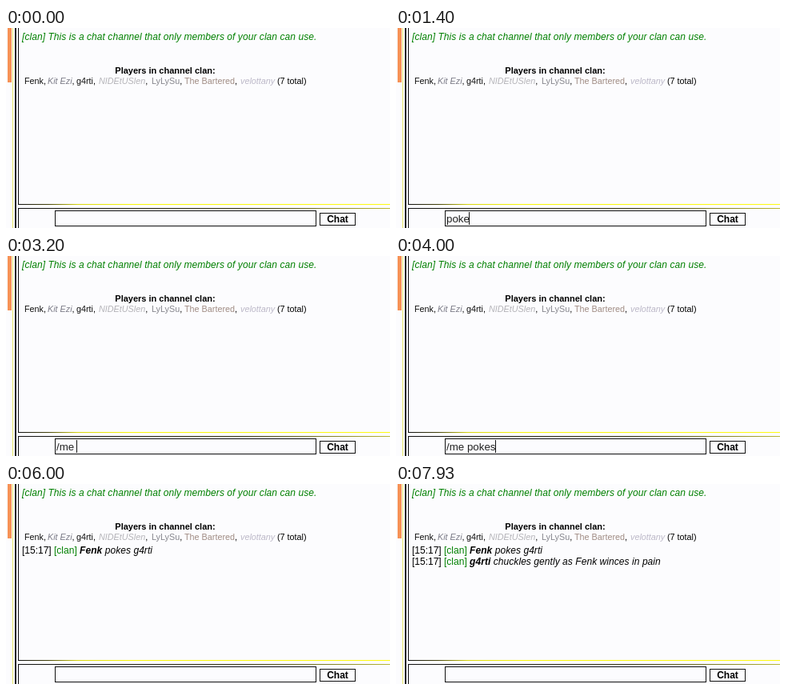
Animation of 480x250 px, one loop 8000 ms. Source, as an HTML page:

```html
<!DOCTYPE html>
<html lang="en">
<head>
<meta charset="utf-8">
<title>Clan chat</title>
<style>
  html, body { margin: 0; width: 100%; height: 100%; overflow: hidden; background: #fcfcfe; }
  svg { display: block; width: 480px; height: 250px; }
  text { font: 12px "Liberation Sans", Arial, sans-serif; white-space: pre; }
  .bold { font-weight: bold; }
  .italic { font-style: italic; letter-spacing: .06px; }
  .title { font-size: 11px; }
  .player { font-size: 10.8px; }
  .player .italic { letter-spacing: 0; }
  .clan { fill: #008000; }
  #typed { font-size: 13.33px; fill: #222; }
  .box { fill: #fcfcfe; stroke: #111; }
</style>
</head>
<body>
<svg viewBox="0 0 480 250">
  <defs>
    <linearGradient id="upper">
      <stop offset="0" stop-color="#111"/>
      <stop offset=".08" stop-color="#44420c"/>
      <stop offset=".16" stop-color="#d8d610"/>
      <stop offset=".3" stop-color="#f8f608"/>
      <stop offset="1" stop-color="#fffb10"/>
    </linearGradient>
    <linearGradient id="lower">
      <stop offset="0" stop-color="#111"/>
      <stop offset=".6" stop-color="#333210"/>
      <stop offset="1" stop-color="#b8b638"/>
    </linearGradient>
  </defs>
  <rect width="480" height="250" fill="#fcfcfe"/>

  <!-- Scrollbar and pane borders -->
  <rect x="2" width="5" height="68" fill="#f79256"/>
  <rect x="8" width="1" height="250" fill="#e9e76a"/>
  <rect x="11" width="2" height="250" fill="#222"/>
  <rect x="15" width="1" height="221" fill="#111"/>
  <rect x="15" y="220" width="465" height="1" fill="url(#upper)"/>
  <rect x="15" y="225" width="1" height="25" fill="#111"/>
  <rect x="15" y="225" width="465" height="1" fill="url(#lower)"/>

  <text class="clan italic" x="20" y="15">[clan] This is a chat channel that only members of your clan can use.</text>
  <text class="title bold" x="199" y="57" text-anchor="middle">Players in channel clan:</text>
  <g id="players"></g>
  <g id="messages"></g>

  <rect class="box" x="61.5" y="228.5" width="326" height="19"/>
  <text id="typed" x="63" y="243"></text>
  <rect id="caret" y="230" width="1" height="16" fill="#111"/>
  <rect class="box" x="392.5" y="231.5" width="44" height="15"/>
  <text class="bold" x="414.5" y="243" text-anchor="middle">Chat</text>
</svg>
<script>
const LOOP = 8000, SENT = 5350, REPLIED = 7400, BLINK = 500;
const ME = "Fenk", FRIEND = "g4rti";
const $ = id => document.getElementById(id);

function add(parent, tag, attributes, content = "") {
  const node = document.createElementNS("http://www.w3.org/2000/svg", tag);
  for (const key in attributes) node.setAttribute(key, attributes[key]);
  node.textContent = content;
  parent.append(node);
  return node;
}

// x, name, colour, style, text after the name
const players = [
  [23, ME, "#111", "", ","],
  [52, "Kit Ezi", "#7c7c88", "italic", ","],
  [88, FRIEND, "#111", "", ","],
  [116, "NIDEtUSlen", "#b4b3b8", "italic", ","],
  [182, "LyLySu", "#85858c", "", ","],
  [223, "The Bartered", "#a08c84", "", ","],
  [293, "velottany", "#bcb8c8", "italic", ""],
  [339, "", "", "", "(7 total)"]
];
for (const [x, name, fill, style, after] of players) {
  const label = add($("players"), "text", { class: "player", x, y: 70 });
  add(label, "tspan", { fill, class: style }, name);
  add(label, "tspan", {}, after);
}

function addMessage(y, name, action) {
  const line = add($("messages"), "text", { x: 20, y });
  add(line, "tspan", {}, "[15:17] ");
  add(line, "tspan", { class: "clan" }, "[clan] ");
  add(line, "tspan", { class: "bold italic" }, name);
  add(line, "tspan", { class: "italic" }, " " + action);
  return line;
}
const sentLine = addMessage(87, ME, `pokes ${FRIEND}`);
const replyLine = addMessage(101, FRIEND, `chuckles gently as ${ME} winces in pain`);

const FIRST = "poke", SECOND = `/me pokes ${FRIEND}`;
const count = (t, start, step) => Math.max(0, Math.floor((t - start) / step) + 1);

function inputAt(t) {
  if (t < 1900) return FIRST.slice(0, count(t, 900, 140));
  if (t < 2650) return FIRST.slice(0, Math.max(0, FIRST.length - count(t, 1900, 120)));
  return t < SENT ? SECOND.slice(0, count(t, 2650, 155)) : "";
}

function draw(t) {
  const value = inputAt(t);
  $("typed").textContent = value;
  const width = value ? $("typed").getComputedTextLength() : 0;
  $("caret").setAttribute("x", Math.floor(63 + width));
  const busy = t >= 850 && t < SENT;
  const blinkOn = (t + LOOP - SENT) % (2 * BLINK) < BLINK;
  $("caret").style.display = busy || blinkOn ? "" : "none";
  sentLine.style.display = t >= SENT ? "" : "none";
  replyLine.style.display = t >= REPLIED ? "" : "none";
}

const started = performance.now();
function tick() {
  draw((performance.now() - started) % LOOP);
  requestAnimationFrame(tick);
}
tick();
</script>
</body>
</html>
```
